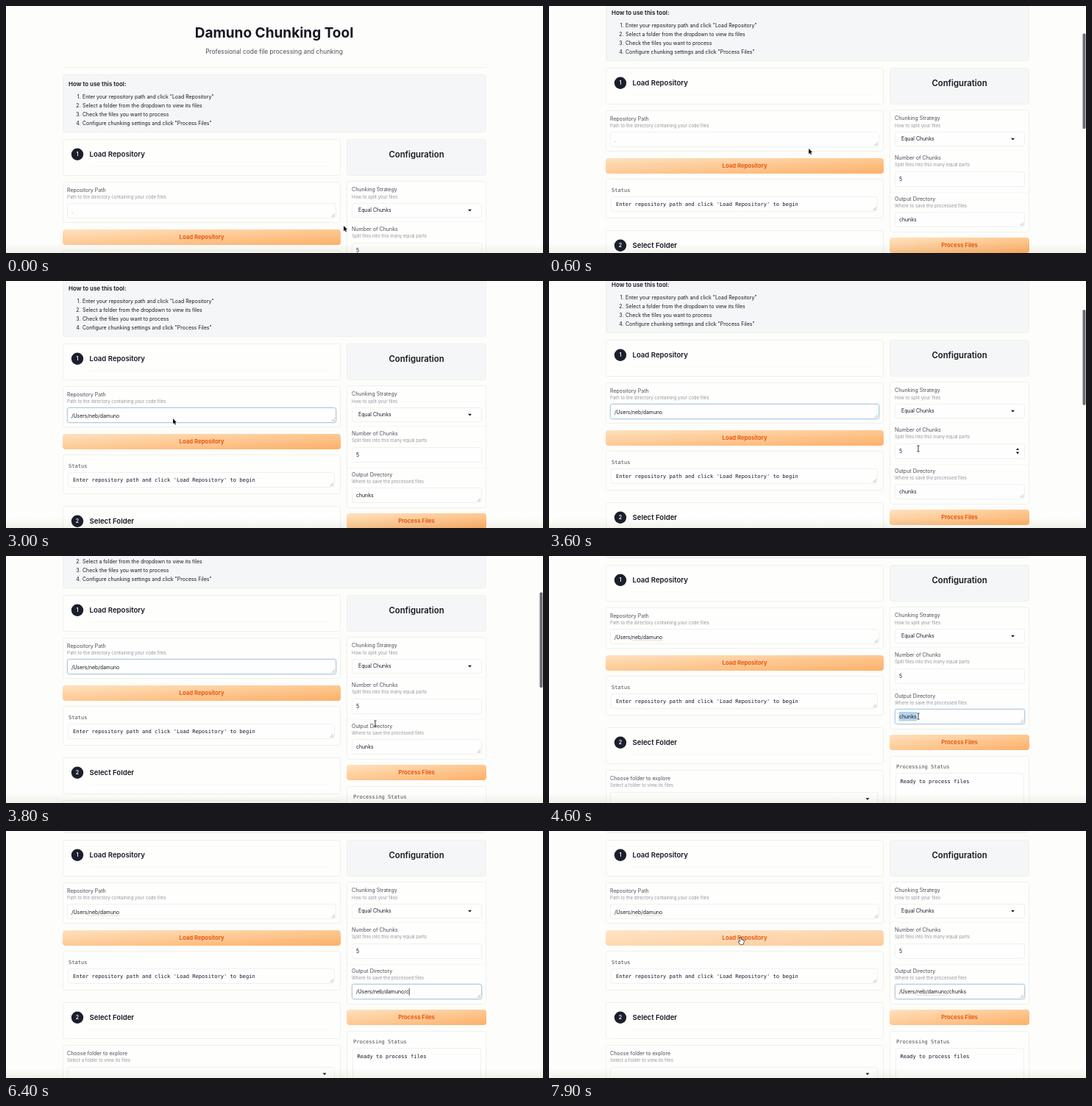
An HTML page with a canvas that plays this animation: 730x336 px, repeating every 8000 ms.

```html
<!DOCTYPE html>
<html lang="en">
<head>
<meta charset="utf-8">
<title>Chunking tool</title>
<style>
  html, body { margin: 0; width: 100%; height: 100%; overflow: hidden; background: #fdfdfb; }
  canvas { display: block; width: 730px; height: 336px; }
</style>
</head>
<body>
<canvas id="stage" width="730" height="336"></canvas>
<script>
const ctx = document.getElementById("stage").getContext("2d");
const W = 730, H = 336, LOOP = 8000, STEP = 100;
const SANS = "Inter, sans-serif", MONO = '"DejaVu Sans Mono", monospace';
const INK = "#151821", LABEL = "#4b4e57", MUTED = "#94969d";
const PAGE = "#fdfdfb", CARD = "#fefefd", PANEL = "#f5f6f7", LINE = "#f0f0ea", RULE = "#f7f7f4";
const ROOT = "/Users/neb/damuno";

const smooth = u => u * u * (3 - 2 * u);

// Keys are [time, value, value...]; eased between neighbours.
function track(keys, t) {
  const next = keys.findIndex(k => k[0] > t);
  if (next < 0) return keys[keys.length - 1].slice(1);
  if (next === 0) return keys[0].slice(1);
  const a = keys[next - 1], b = keys[next];
  const u = smooth((t - a[0]) / (b[0] - a[0]));
  return a.slice(1).map((v, i) => v + (b[i + 1] - v) * u);
}

const scrollKeys = [[0, 0], [50, 0], [600, 97], [1000, 97], [1100, 96], [3500, 96], [4150, 169]];
const barKeys = [[0, 0], [100, 0], [200, 1], [1000, 1], [1300, 0], [3400, 0], [3500, 1], [4300, 1], [4600, 0]];
const cursorKeys = [
  [0, 459, 299], [50, 459, 299], [600, 353, 194], [900, 353, 194], [1400, 205, 184],
  [2900, 205, 184], [3500, 502, 228], [3900, 502, 228], [4300, 502, 218],
  [7200, 502, 218], [7800, 260.5, 146]
];

function text(str, x, y, size, color = INK, { weight = 400, align = "left", font = SANS } = {}) {
  ctx.font = `${weight} ${size}px ${font}`;
  ctx.textAlign = align;
  ctx.fillStyle = color;
  ctx.fillText(str, x, y + size * 0.36);
}

function box(x, y, w, h, fill, stroke = LINE, r = 3) {
  ctx.beginPath();
  ctx.roundRect(x + 0.5, y + 0.5, w - 1, h - 1, r);
  ctx.fillStyle = fill;
  ctx.fill();
  ctx.strokeStyle = stroke;
  ctx.lineWidth = 1;
  ctx.stroke();
}

function poly(points, fill, stroke) {
  ctx.beginPath();
  points.forEach(([x, y]) => ctx.lineTo(x, y));
  ctx.closePath();
  if (stroke) {
    ctx.strokeStyle = stroke;
    ctx.lineWidth = 1.2;
    ctx.stroke();
  }
  ctx.fillStyle = fill;
  ctx.fill();
}

function segment(x1, y1, x2, y2, color, width = 1) {
  ctx.beginPath();
  ctx.moveTo(x1, y1);
  ctx.lineTo(x2, y2);
  ctx.strokeStyle = color;
  ctx.lineWidth = width;
  ctx.stroke();
}

function field(x, y, w, h, { focus = false, grip = false } = {}) {
  if (focus) {
    ctx.fillStyle = "#e8f0f6";
    ctx.beginPath();
    ctx.roundRect(x - 1, y - 1, w + 2, h + 2, 4);
    ctx.fill();
  }
  box(x, y, w, h, "#fefefe", focus ? "#b0cbdd" : LINE);
  if (grip) {
    for (const d of [2, 4.5]) segment(x + w - 2 - d, y + h - 2, x + w - 2, y + h - 2 - d, "#85858a", 0.6);
  }
}

function arrowDown(x, y) {
  poly([[x - 2.5, y - 1.3], [x + 2.5, y - 1.3], [x, y + 1.6]], INK);
}

// Gradient runs corner to corner, like CSS "to bottom right".
function button(label, x, y, w, h, hover) {
  const k = w * h / (w * w + h * h), cx = x + w / 2, cy = y + h / 2;
  const g = ctx.createLinearGradient(cx - h * k, cy - w * k, cx + h * k, cy + w * k);
  g.addColorStop(0, hover ? "#ffe4c6" : "#ffe1be");
  g.addColorStop(1, hover ? "#fdcb9a" : "#fdb068");
  ctx.beginPath();
  ctx.roundRect(x, y, w, h, 4);
  ctx.fillStyle = g;
  ctx.fill();
  text(label, cx, cy, 7.75, "#e0500c", { weight: 600, align: "center" });
}

function stepCard(n, title, y) {
  box(77, y, 378, 50, CARD);
  segment(114, y + 37, 440, y + 37, RULE);
  ctx.beginPath();
  ctx.arc(97, y + 20.7, 8.2, 0, 7);
  ctx.fillStyle = "#1a1f2b";
  ctx.fill();
  text(n, 97, y + 20.7, 7, "#fff", { weight: 600, align: "center" });
  text(title, 113.5, y + 21, 9.6, INK, { weight: 600 });
}

function caption(label, info, x, y) {
  text(label, x, y, 7.05, LABEL);
  text(info, x, y + 10, 6.1, MUTED);
}

function squiggle(x, y, from, to) {
  ctx.font = `400 6.9px ${SANS}`;
  const start = x + ctx.measureText(from).width, end = x + ctx.measureText(to).width;
  ctx.setLineDash([1, 1]);
  segment(start, y, end, y, "#d8a08c", 0.8);
  ctx.setLineDash([]);
}

function header() {
  text("Damuno Chunking Tool", 364.5, 36, 19, INK, { weight: 700, align: "center" });
  text("Professional code file processing and chunking", 364.5, 61.5, 8.35, LABEL, { align: "center" });
  segment(77, 83.5, 653, 83.5, LINE);
  box(77, 93, 576, 79, PANEL);
  text("How to use this tool:", 85, 106.5, 8, INK, { weight: 600 });
  [
    'Enter your repository path and click "Load Repository"',
    "Select a folder from the dropdown to view its files",
    "Check the files you want to process",
    'Configure chunking settings and click "Process Files"'
  ].forEach((line, i) => {
    text(`${i + 1}.`, 101.5, 123.5 + i * 12, 6.95, INK, { align: "right" });
    text(line, 104, 123.5 + i * 12, 6.95);
  });
}

function leftColumn(t) {
  const mono = { font: MONO };
  stepCard("1", "Load Repository", 181);
  box(77, 239, 378, 56, CARD);
  caption("Repository Path", "Path to the directory containing your code files", 83, 250);
  const focus = t >= 1400 && t < 4400;
  field(83, 268, 366, 21, { focus, grip: true });
  if (t < 1900) text(".", 89, 279.3, 6.9);
  else if (t < 2900) text("Enter path to your code repository (e.g., /Users/yourname/project or .)", 89, 279.3, 6.9, "#9b9da3");
  else {
    text(ROOT, 89, 279.3, 6.9);
    if (!focus) squiggle(89, 284, "/Users/", ROOT);
  }
  button("Load Repository", 77, 304, 378, 21, t >= 7600);

  box(77, 332, 378, 54, CARD);
  text("Status", 85, 347, 7.1, LABEL, mono);
  field(84, 356, 363, 21, { grip: true });
  text("Enter repository path and click 'Load Repository' to begin", 91, 366.7, 7.1, INK, mono);

  stepCard("2", "Select Folder", 402);
  box(77, 460, 378, 60, CARD);
  caption("Choose folder to explore", "Select a folder to view its files", 83, 471);
  field(83, 490, 364, 20);
  arrowDown(433, 499.5);
}

function outputText(t) {
  if (t < 5400) return "chunks";
  const typed = t < 6200 ? 0 : t < 6400 ? 1 : t < 6600 ? 2 : Math.min(7, 3 + Math.floor((t - 6600) / 100));
  return ROOT + "/chunks".slice(0, typed);
}

function rightColumn(t) {
  const mono = { font: MONO };
  box(463, 181, 190, 50, PANEL);
  text("Configuration", 558, 202, 11.3, INK, { weight: 600, align: "center" });

  box(463, 238, 190, 167, CARD);
  segment(464, 293.5, 652, 293.5, RULE);
  segment(464, 350.5, 652, 350.5, RULE);
  caption("Chunking Strategy", "How to split your files", 470, 249.7);
  field(470, 268, 177, 20);
  text("Equal Chunks", 479, 278, 6.9);
  arrowDown(630.5, 278);

  caption("Number of Chunks", "Split files into this many equal parts", 470, 303.3);
  field(470, 322, 177, 21);
  text("5", 476, 332.7, 6.9);
  if (t >= 3300 && t < 3800) {
    poly([[634.8, 331], [639.2, 331], [637, 328.2]], INK);
    poly([[634.8, 333.6], [639.2, 333.6], [637, 336.4]], INK);
  }

  caption("Output Directory", "Where to save the processed files", 470, 359);
  field(470, 377, 177, 21, { focus: t >= 4400, grip: true });
  const value = outputText(t);
  ctx.font = `400 6.9px ${SANS}`;
  const end = 476 + ctx.measureText(value).width;
  if (t >= 4500 && t < 5400) {
    ctx.fillStyle = "#b3d3ea";
    ctx.fillRect(475.5, 381, end - 475, 12.5);
  }
  text(value, 476, 387.5, 6.9);
  if (t >= 5400 && t < 7300) segment(end + 0.6, 383, end + 0.6, 392.5, INK, 0.8);
  if (t >= 7100) squiggle(476, 392.3, "/Users/", ROOT);

  button("Process Files", 463, 412, 190, 21, false);
  box(463, 441, 190, 80, CARD);
  text("Processing Status", 472, 455.3, 7.1, LABEL, mono);
  field(471, 464, 175, 50);
  text("Ready to process files", 477.5, 475.3, 7.1, INK, mono);
}

function pointer(kind) {
  if (kind === "arrow") {
    poly([[0, 0], [0, 7.2], [1.7, 5.7], [2.8, 8.2], [4, 7.7], [2.9, 5.2], [5.1, 5.1]], "#111", "#fff");
  } else if (kind === "beam") {
    segment(0, -3.8, 0, 3.8, "#222", 0.9);
    segment(-1.7, -4, 1.7, -4, "#222", 0.8);
    segment(-1.7, 4, 1.7, 4, "#222", 0.8);
  } else {
    ctx.lineJoin = "round";
    poly([[-0.8, -0.8], [0.6, -0.8], [0.8, 2], [4.2, 2.7], [4.3, 5], [3.4, 8], [-0.6, 8], [-3, 4.6], [-2.2, 3.8], [-0.8, 5]], "#fff", "#111");
  }
}

function cursor(t) {
  if ((t >= 2000 && t < 2900) || (t >= 5000 && t < 7300)) return;
  const [x, y] = track(cursorKeys, t);
  const beam = (t >= 1300 && t < 3000) || (t >= 3400 && t < 7400);
  ctx.save();
  ctx.translate(x, y);
  pointer(beam ? "beam" : t >= 7600 ? "hand" : "arrow");
  ctx.restore();
}

function overlays(t, scroll) {
  const fade = ctx.createLinearGradient(0, 322, 0, H);
  fade.addColorStop(0, "#ffffff");
  fade.addColorStop(1, "#f3f3ee");
  ctx.globalCompositeOperation = "multiply";
  ctx.fillStyle = fade;
  ctx.fillRect(0, 322, W, 14);
  ctx.globalCompositeOperation = "source-over";
  const [alpha] = track(barKeys, t);
  if (alpha > 0) {
    ctx.globalAlpha = alpha;
    ctx.fillStyle = "#6e6e6e";
    ctx.beginPath();
    ctx.roundRect(725.5, scroll * 0.385, 4, 130, 2);
    ctx.fill();
    ctx.globalAlpha = 1;
  }
}

function draw(now) {
  const t = Math.floor((now % LOOP) / STEP) * STEP;
  const scroll = Math.round(track(scrollKeys, t)[0]);
  ctx.fillStyle = PAGE;
  ctx.fillRect(0, 0, W, H);
  ctx.save();
  ctx.translate(0, -scroll);
  header();
  leftColumn(t);
  rightColumn(t);
  ctx.restore();
  overlays(t, scroll);
  cursor(t);
}

const began = performance.now();
function frame() {
  draw(performance.now() - began);
  requestAnimationFrame(frame);
}
frame();
</script>
</body>
</html>
```
